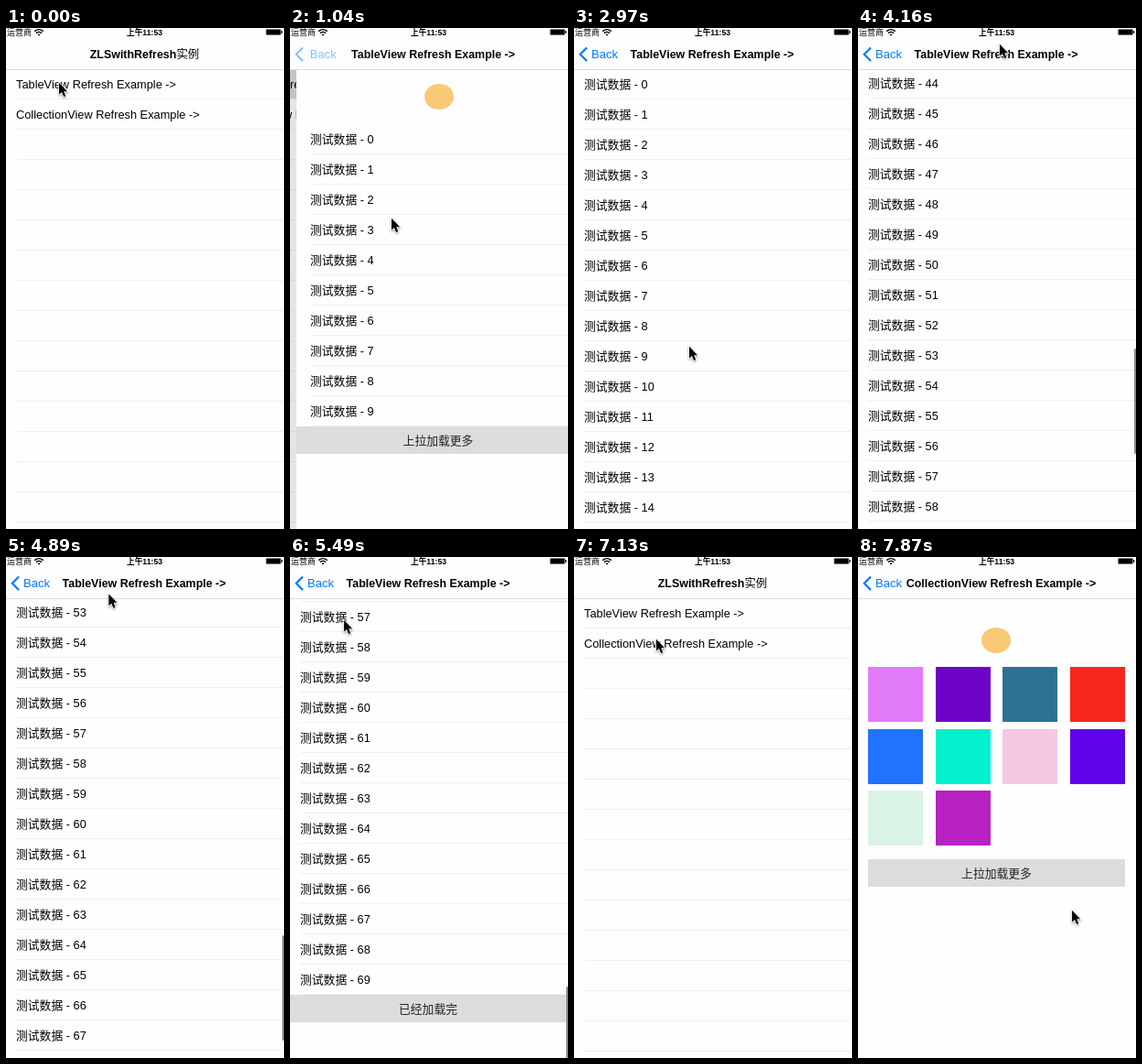
These frames come from a looping animation (304 by 547 pixels, 8 s). An HTML page:

```html
<!DOCTYPE html>
<html lang="zh">
<head>
<meta charset="utf-8">
<title>Refresh example</title>
<style>
html, body { margin: 0; width: 100%; height: 100%; overflow: hidden; background: #fff; }
#stage { position: relative; width: 304px; height: 547px; overflow: hidden; background: #fdfdfd;
  font: 12.8px/33px "Liberation Sans", "Noto Sans CJK SC", "Noto Sans CJK", sans-serif; color: #000; }
#stage div, #stage span, #stage svg { position: absolute; white-space: nowrap; }
.page { top: 0; left: 0; width: 304px; height: 547px; }
.page > .back { top: 0; bottom: 0; left: -4px; right: 0; background: #fefefe; }
.row { left: 0; width: 304px; height: 33px; text-indent: 11px; }
.row::after { content: ""; position: absolute; left: 11px; right: 0; bottom: 0; height: 1px; background: #f0f0f0; }
.foot { height: 30px; line-height: 31px; text-align: center; background: #dcdcdc; color: #222; }
#rows { top: 45px; left: 0; width: 304px; }
#rows .foot { left: -4px; width: 308px; text-indent: 2px; }
.face { width: 32px; height: 28px; border-radius: 50%; background: #f9c978; }
.cell { width: 60px; height: 60px; }
#dim { inset: 0; background: #000; }
#bar { left: 302px; width: 2px; border-radius: 1px; background: #8c8c8c; }
#nav { top: 0; left: 0; width: 304px; height: 45px; background: #fdfdfd; border-bottom: 1px solid #dcdcdc; }
.title { top: 13px; left: 0; font-size: 12.45px; font-weight: bold; }
.title i { font-style: normal; font-weight: 500; }
#back { left: 0; top: 0; width: 60px; height: 45px; color: #007aff; }
#back span { left: 19px; top: 12px; font-size: 13px; }
.status { top: 0; font-size: 9px; line-height: 10px; }
</style>
</head>
<body>
<div id="stage">
  <div class="page" id="menu"><div class="back"></div><div id="dim"></div></div>
  <div class="page" id="table"><div class="back"></div><div id="rows"></div><div id="bar"></div></div>
  <div class="page" id="grid"><div class="back"></div></div>
  <div id="nav">
    <div class="title" id="menuTitle">ZLSwithRefresh<i>实例</i></div>
    <div class="title" id="tableTitle">TableView Refresh Example -&gt;</div>
    <div class="title" id="gridTitle">CollectionView Refresh Example -&gt;</div>
    <div id="back">
      <svg width="20" height="45" fill="none" stroke="#007aff" stroke-width="2.2"><path d="M14 21.5L6.8 28.8L14 36"/></svg>
      <span id="backLabel">Back</span>
    </div>
    <div class="status" style="left:1px">运营商</div>
    <svg style="left:30px;top:0" width="12" height="10" fill="none" stroke="#000" stroke-width="1.4">
      <path d="M1.2 3.6Q6 -.4 10.8 3.6M3 5.6Q6 3.2 9 5.6"/><path d="M4.4 7Q6 5.8 7.6 7L6 8.6Z" fill="#000" stroke="none"/>
    </svg>
    <div class="status" style="left:0;width:303px;text-align:center;font-weight:bold;font-size:8.7px">上午11:53</div>
    <svg style="left:284px;top:1px" width="20" height="8">
      <rect x=".5" y=".5" width="16" height="6" rx="1" stroke="#777"/><rect x="17" y="2.2" width="1.3" height="2.6"/>
    </svg>
  </div>
  <svg id="cursor" width="15" height="20" viewBox="-2 -2 16 22" style="left:-2px;top:-2px;filter:drop-shadow(0 1px 1px #0006)">
    <path d="M0 0V14L3.2 11.2L5.6 16.8L8 15.8L5.7 10.3H10Z" stroke="#fff" stroke-width="1.6" paint-order="stroke"/>
  </svg>
</div>
<script>
const $ = id => document.getElementById(id);
const LOOP = 8000, STEP = 148.5, W = 304, ROW = 33, END = 1836;

function add(parent, cls, text = "", style = {}) {
  const el = document.createElement("div");
  el.className = cls;
  el.textContent = text;
  Object.assign(el.style, style);
  parent.append(el);
  return el;
}
const px = n => n + "px";

// Menu page
const labels = ["TableView Refresh Example ->", "CollectionView Refresh Example ->"];
const menuRows = Array.from({ length: 16 }, (_, k) =>
  add($("menu"), "row", labels[k] || "", { top: px(45 + k * ROW) }));
$("menu").append($("dim"));

// Table page
const rows = Array.from({ length: 70 }, (_, k) =>
  add($("rows"), "row", "测试数据 - " + k, { top: px(k * ROW) }));
const foot = add($("rows"), "foot");
add($("rows"), "face", "", { left: "136px", top: "-44px" });

// Collection page
add($("grid"), "face", "", { left: "135px", top: "77px" });
["#e27bf9", "#6d04c6", "#2e7293", "#f8261d", "#1f73fd", "#02f0cb", "#f3c9e2", "#5d02ea", "#d9f4e6", "#b821c2"]
  .forEach((background, k) => add($("grid"), "cell", "", {
    background, left: px(11 + k % 4 * 73.5), top: px(120 + Math.floor(k / 4) * 67.5)
  }));
add($("grid"), "foot", "上拉加载更多", { left: "11px", top: "330px", width: "281px" });

// Keys: [step, value...]
const pointer = [
  [0, 58, 60], [2, 93, 65], [5, 93, 65], [7, 111, 208], [8, 118, 212], [12, 160, 62],
  [17, 124, 349], [20, 126, 348], [28, 155, 18], [37, 59, 69], [42, 31, 23], [45, 31, 23],
  [48, 90, 90], [50, 90, 92], [53, 234, 386]
];
const scroll = [
  [0, -60], [10, -60], [11, -26], [12, 0], [20, 0], [21, 60], [22, 200], [23, 420], [26, 1100],
  [27, 1298], [28, 1453], [29, 1560], [31, 1700], [34, 1850], [36, 1886], [37, 1877],
  [38, 1858], [39, 1844], [41, END]
];
const slide = [
  [5, W], [6, 90], [7, 11], [8, 0], [44, 0], [45, 50], [46, 230], [47, 296], [48, W],
  [50, W], [51, 90], [52, 11], [53, 0]
];

function at(keys, i, col = 1) {
  const n = keys.findIndex(k => k[0] >= i);
  if (n < 0) return keys[keys.length - 1][col];
  if (n === 0) return keys[0][col];
  const a = keys[n - 1], b = keys[n];
  return a[col] + (b[col] - a[col]) * (i - a[0]) / (b[0] - a[0]);
}

const move = (el, x, y = 0) => { el.style.transform = `translate(${x}px, ${y}px)`; };
const show = (el, on) => { el.style.display = on ? "" : "none"; };

function title(el, center, opacity) {
  el.style.transform = `translateX(${center}px) translateX(-50%)`;
  el.style.opacity = opacity;
}

function draw(i) {
  const off = at(slide, i), open = 1 - off / W;
  const onGrid = i >= 49, shown = off < W;

  move($("menu"), -96 * open);
  $("dim").style.opacity = .1 * open;
  menuRows[0].style.background = i >= 5 && i < 47 ? "#d9d9d9" : "";
  menuRows[1].style.background = i >= 50 ? "#d9d9d9" : "";

  show($("table"), shown && !onGrid);
  show($("grid"), shown && onGrid);
  move($("table"), off);
  move($("grid"), off);

  title($("menuTitle"), 151.5 - 100 * open, (1 - open) ** 2);
  title($("tableTitle"), 151 + off / 2, onGrid ? 0 : open);
  title($("gridTitle"), 156.5 + off / 2, onGrid ? open : 0);
  $("back").style.opacity = i === 44 ? .2 : Math.max(0, 1 - off * .05);
  move($("backLabel"), off * .25);

  const s = at(scroll, i), count = i < 19 ? 10 : 70;
  move($("rows"), 0, -s);
  rows.forEach((r, k) => show(r, k < count));
  foot.style.top = px(count * ROW);
  foot.textContent = count < 70 ? "上拉加载更多" : "已经加载完";

  const top = 43 + s * .2115 + Math.max(0, s - END) * .7;
  show($("bar"), i > 20 && i < 42);
  $("bar").style.top = px(top);
  $("bar").style.height = px(Math.min(115, 547 - top));

  move($("cursor"), at(pointer, i), at(pointer, i, 2));
}

const start = performance.now();
function tick() {
  const t = (performance.now() - start) % LOOP;
  draw(Math.min(53, Math.floor((t + 5) / STEP)));
  requestAnimationFrame(tick);
}
tick();
</script>
</body>
</html>
```
